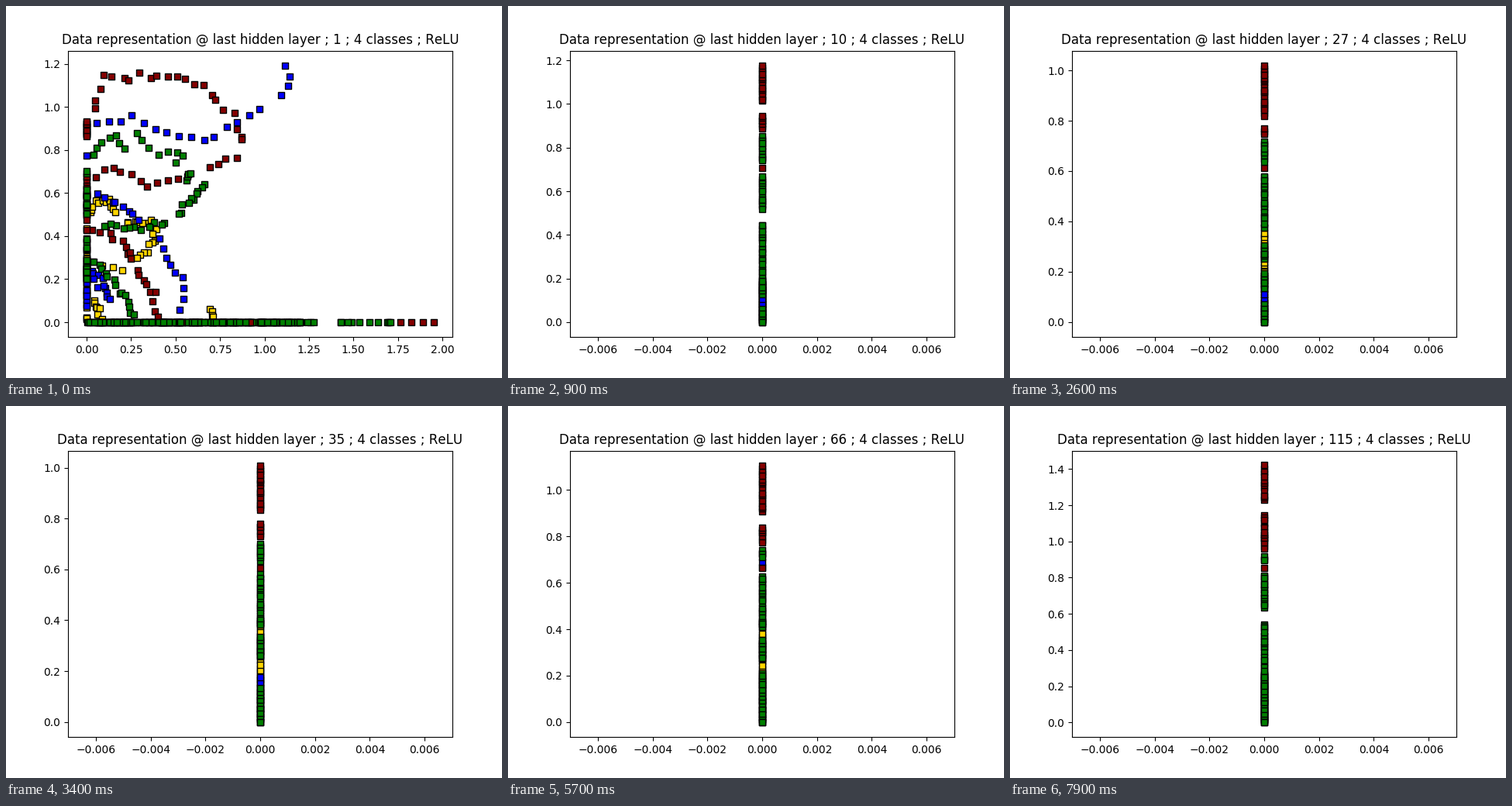
Write a matplotlib script that moves like this. It is 640 px wide and 480 px high and loops after 8000 ms.

```python
import numpy as np
import matplotlib.pyplot as plt
from matplotlib.animation import FuncAnimation

plt.rcParams["text.kerning_factor"] = 6

FRAMES, STEP = 80, 100
SPREAD_FRAMES = 2
COLORS = ["gold", "blue", "#850000", "green"]
SIZE = 40
AX_W, AX_H = 496, 369.6
X_MAX = 1.952

rng = np.random.default_rng(7)


def strand(n, *pts, jitter=.008):
    """n points spread along a polyline with a little scatter."""
    p = np.array(pts)
    d = np.r_[0, np.cumsum(np.hypot(*np.diff(p, axis=0).T))]
    t = np.linspace(0, d[-1], n)
    xy = np.c_[np.interp(t, d, p[:, 0]), np.interp(t, d, p[:, 1])]
    return xy + rng.normal(0, jitter, xy.shape)


def column(n, lo, hi):
    return np.c_[np.zeros(n), rng.uniform(lo, hi, n)]


def row(n, lo, hi):
    return np.c_[rng.uniform(lo, hi, n), np.zeros(n)]


# wide layout of the first epochs
gold = [
    strand(12, (.02, .51), (.04, .555), (.14, .57), (.17, .51)),
    strand(17, (.23, .465), (.36, .47), (.39, .43), (.35, .34), (.285, .295)),
    strand(7, (.03, .105), (.06, .07), (.08, .03)),
    strand(4, (.695, .06), (.71, .02), jitter=.004),
    strand(3, (.09, .265), (.2, .25)),
    column(25, 0, .57), row(60, 0, 1.22),
]
blue = [
    strand(15, (.055, .93), (.26, .95), (.44, .88), (.65, .84), (.9, .95),
           (.965, .995)),
    strand(4, (1.095, 1.055), (1.155, 1.12), (1.115, 1.193), jitter=0),
    strand(8, (.075, .59), (.15, .57), (.3, .49)),
    strand(9, (.405, .39), (.5, .23), (.56, .165), (.535, .06)),
    strand(11, (.02, .24), (.1, .19), (.12, .1), jitter=.012),
    column(20, .06, .3), column(1, .77, .78), row(50, 0, 1.1),
]
red = [
    strand(26, (.06, .99), (.065, 1.13), (.4, 1.15), (.56, 1.13), (.8, 1),
           (.88, .86), (.84, .77), (.69, .735), jitter=.012),
    strand(11, (.56, .68), (.33, .64), (.17, .72), (.05, .685)),
    strand(19, (.04, .42), (.08, .45), (.24, .33), (.3, .22), (.39, .14),
           (.39, .03), jitter=.012),
    column(14, .82, .955), column(16, .42, .72), row(40, 0, 1.2),
    strand(4, (1.765, 0), (X_MAX, 0), jitter=0),
]
green = [
    strand(7, (.045, .78), (.07, .84), (.165, .87), (.215, .81)),
    strand(8, (.28, .88), (.385, .795), (.55, .79), (.505, .745)),
    strand(4, (.56, .665), (.58, .7), jitter=.004),
    strand(10, (.66, .64), (.6, .58), (.515, .515)),
    strand(11, (.445, .465), (.32, .44), (.23, .44), (.095, .45)),
    strand(15, (.03, .29), (.1, .25), (.18, .16), (.22, .1), (.26, .02)),
    column(10, .5, .62), column(18, .19, .4), column(2, .68, .72),
    row(100, 0, 1.3), row(10, 1.38, 1.73),
]
wide = [np.vstack(c) for c in (gold, blue, red, green)]

# collapsed layout, in heights relative to the topmost marker


def stack(n):
    """Shuffled, nearly even heights in 0..1, ends included."""
    u = np.linspace(0, 1, n)
    u[1:-1] += rng.normal(0, .3 / n, n - 2)
    return rng.permutation(u)


GOLD_U, RED_U, GREEN_U = stack(40), stack(30), stack(75)


def cut(y, gaps):
    """Drop the markers that fall inside a gap (centre, half width)."""
    return y[np.all([abs(y - c) > half for c, half in gaps], axis=0)]


def collapsed(k):
    """Marker heights of each class."""
    wave = np.cos(2 * np.pi * (k - 10) / 35)
    gold_top = .42 - .0002 * (k - 45) ** 2
    green_top = .735 - .09 * k / (FRAMES - 1)
    red_low = green_top + .03
    blue_at = min(.08 + .00037 * max(k - 19, 0) ** 2, .72)
    red_at = .6
    gaps = [(.37 + .04 * wave, .022), (blue_at, .026), (red_at, .022)]
    if gold_top > .24:
        gaps.append((.22, .024))
    reds = cut(red_low + (1 - red_low) * RED_U, [(.81 + .03 * wave, .024)])
    return [
        gold_top * GOLD_U,
        np.array([blue_at - .01, blue_at + .01]),
        np.r_[red_at, reds],
        np.r_[cut(green_top * GREEN_U, gaps), 0],
    ]


def epoch(k):
    return round(np.interp(k, [0, 34, 48, 66, 79], [1, 35, 51, 82, 115]))


def y_max(k):
    return np.interp(k, [0, 9, 19, 34, 48, 66, 79],
                     [1.193, 1.176, 1.028, 1.008, .974, 1.236, 1.421])


def limits(top, length):
    """Axis range for 0..top: half a marker plus a 5% margin each side."""
    half = np.sqrt(SIZE) / 2 / length
    margin = half + .05 * (top + 2 * half)
    return -margin, top + margin


fig, ax = plt.subplots(figsize=(6.4, 4.8), dpi=100)
dots = [ax.scatter([], [], marker="s", s=SIZE, color=c, edgecolors="black")
        for c in COLORS]


def draw(k):
    top = y_max(k)
    if k < SPREAD_FRAMES:
        pts = wide
        ax.set_xlim(limits(X_MAX, AX_W))
    else:
        pts = [np.c_[0 * y, y * top] for y in collapsed(k)]
        ax.set_xlim(limits(0, AX_W))
    ax.set_ylim(limits(top, AX_H))
    for d, p in zip(dots, pts):
        d.set_offsets(p)
    ax.set_title(f"Data representation @ last hidden layer ; {epoch(k)}"
                 " ; 4 classes ; ReLU")
    return dots


anim = FuncAnimation(fig, draw, frames=FRAMES, interval=STEP,
                     repeat=True, repeat_delay=0)
plt.show()
```
